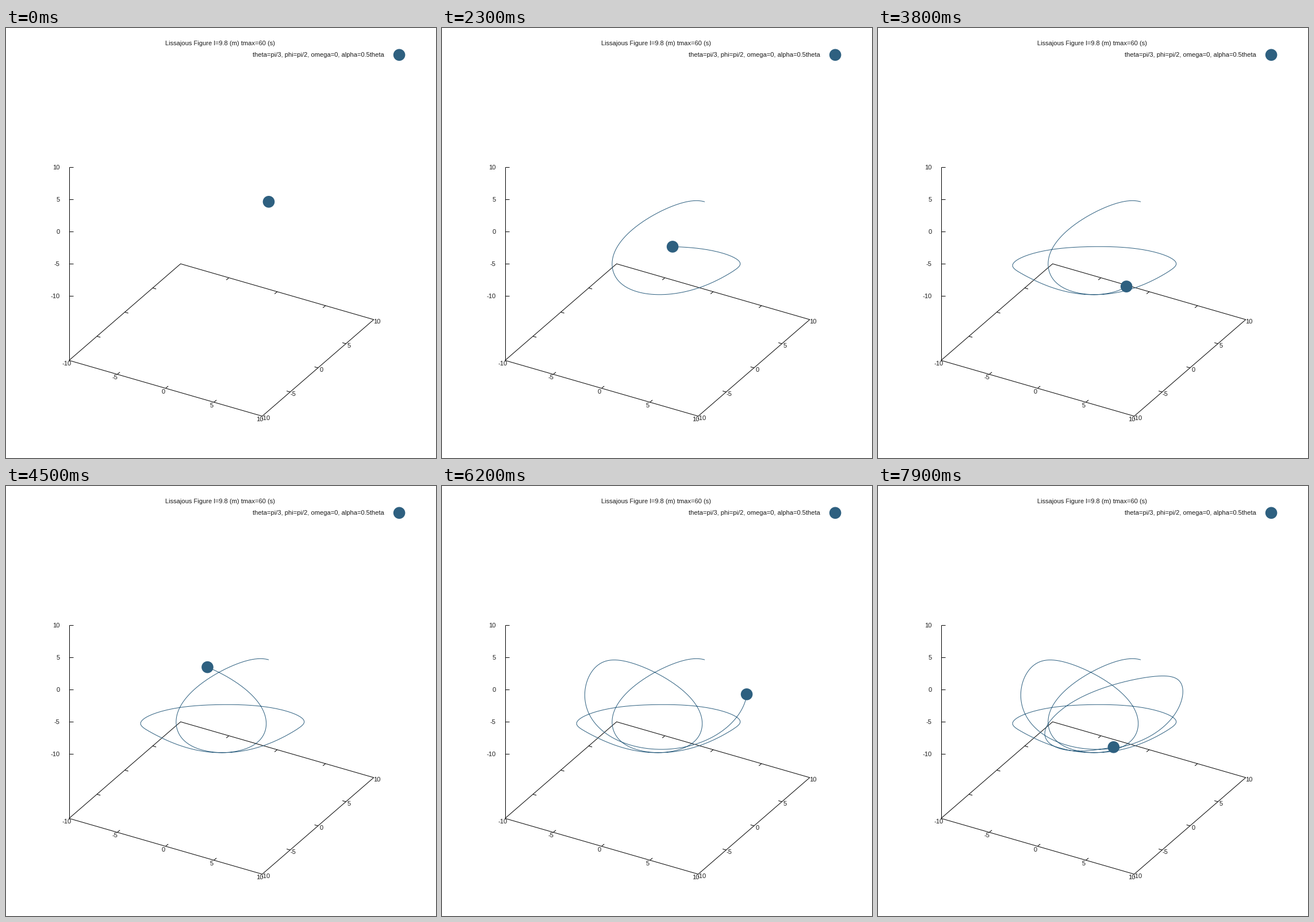
Animation, 748 px wide and 748 px high, one loop 8 s. Source, as a matplotlib script:

```python
import numpy as np
import matplotlib.pyplot as plt
from matplotlib.animation import FuncAnimation
from matplotlib.patches import Circle

SIZE, DPI = 748, 100
FRAMES, INTERVAL = 80, 100
DT, SUB = 0.25, 20           # simulated seconds per frame, substeps per frame
LENGTH = GRAVITY = 9.8
SCALE = 19.4                 # pixels per unit before rotation
CENTER = np.array([374.2, 318.2])
FLOOR = -20
BLUE = "#2e6080"
PX = 72 / DPI
FONT = dict(family="Liberation Sans", size=11.15 * PX, color="#1c1c1c")


def project(x, y, z):
    """View rotated by 60 and 30 degrees, in stage pixels."""
    c, s = np.cos(np.pi / 6), np.sin(np.pi / 6)
    u = SCALE * (c * x + s * y)
    v = SCALE * (s * x - c * y) / 2 - SCALE * c / 1.5 * z
    return np.array([CENTER[0] + u, CENTER[1] + v])


def rates(state):
    theta, omega, phi, alpha = state
    sin, cos = np.sin(theta), np.cos(theta)
    return np.array([
        omega,
        alpha**2 * sin * cos - GRAVITY / LENGTH * sin,
        alpha,
        -2 * omega * alpha * sin / cos,
    ])


def simulate(steps, h):
    state = np.array([np.pi / 3, 0, np.pi / 2, np.pi / 6])
    states = [state]
    for _ in range(steps):
        k1 = rates(state)
        k2 = rates(state + h / 2 * k1)
        k3 = rates(state + h / 2 * k2)
        k4 = rates(state + h * k3)
        state = state + h / 6 * (k1 + 2 * k2 + 2 * k3 + k4)
        states.append(state)
    return np.array(states).T


theta, _, phi, _ = simulate((FRAMES - 1) * SUB, DT / SUB)
path = project(LENGTH * np.sin(theta) * np.cos(phi),
               LENGTH * np.sin(theta) * np.sin(phi),
               -LENGTH * np.cos(theta))

fig = plt.figure(figsize=(SIZE / DPI, SIZE / DPI), dpi=DPI, facecolor="white")
ax = fig.add_axes([0, 0, 1, 1])
ax.set_xlim(-0.5, SIZE - 0.5)
ax.set_ylim(SIZE - 0.5, -0.5)
ax.axis("off")


def line(*points):
    xs, ys = zip(*points)
    ax.plot(xs, ys, color="black", lw=PX, solid_capstyle="butt", zorder=1)


def label(x, y, text, ha="center"):
    ax.text(x, y + 4, text, ha=ha, va="baseline", **FONT)


def tick(point, step):
    line(point, point + np.array(step))


corners = [project(x, y, FLOOR)
           for x, y in ((-10, -10), (10, -10), (10, 10), (-10, 10), (-10, -10))]
line(*corners)
line(project(-10, -10, FLOOR), project(-10, -10, 10))

for v in range(-10, 11, 5):
    near, far = project(v, -10, FLOOR), project(v, 10, FLOOR)
    left, right = project(-10, v, FLOOR), project(10, v, FLOOR)
    up = project(-10, -10, v)
    if abs(v) < 10:
        tick(near, (4.4, -3.8))
        tick(far, (-4.4, 3.8))
        tick(left, (6, 1.8))
        tick(right, (-6, -1.8))
    tick(up, (7, 0))
    label(near[0] - 4.5, near[1] + 5, str(v))
    label(right[0] + 5.5, right[1] + 3, str(v))
    label(93, up[1], str(v), "right")

label(372.5, 26, "Lissajous Figure l=9.8 (m) tmax=60 (s)")
label(657, 46, "theta=pi/3, phi=pi/2, omega=0, alpha=0.5theta", "right")
ax.add_patch(Circle((683.6, 46.3), 10.3, color=BLUE, lw=0))

trail, = ax.plot([], [], color=BLUE, lw=PX, solid_capstyle="butt", zorder=2)
bob = ax.add_patch(Circle(path[:, 0], 10.3, color=BLUE, lw=0, zorder=3))


def update(i):
    end = i * SUB
    trail.set_data(path[0, :end + 1], path[1, :end + 1])
    bob.center = tuple(path[:, end])
    return trail, bob


anim = FuncAnimation(fig, update, frames=FRAMES, interval=INTERVAL,
                     repeat=True, repeat_delay=0)
plt.show()
```
